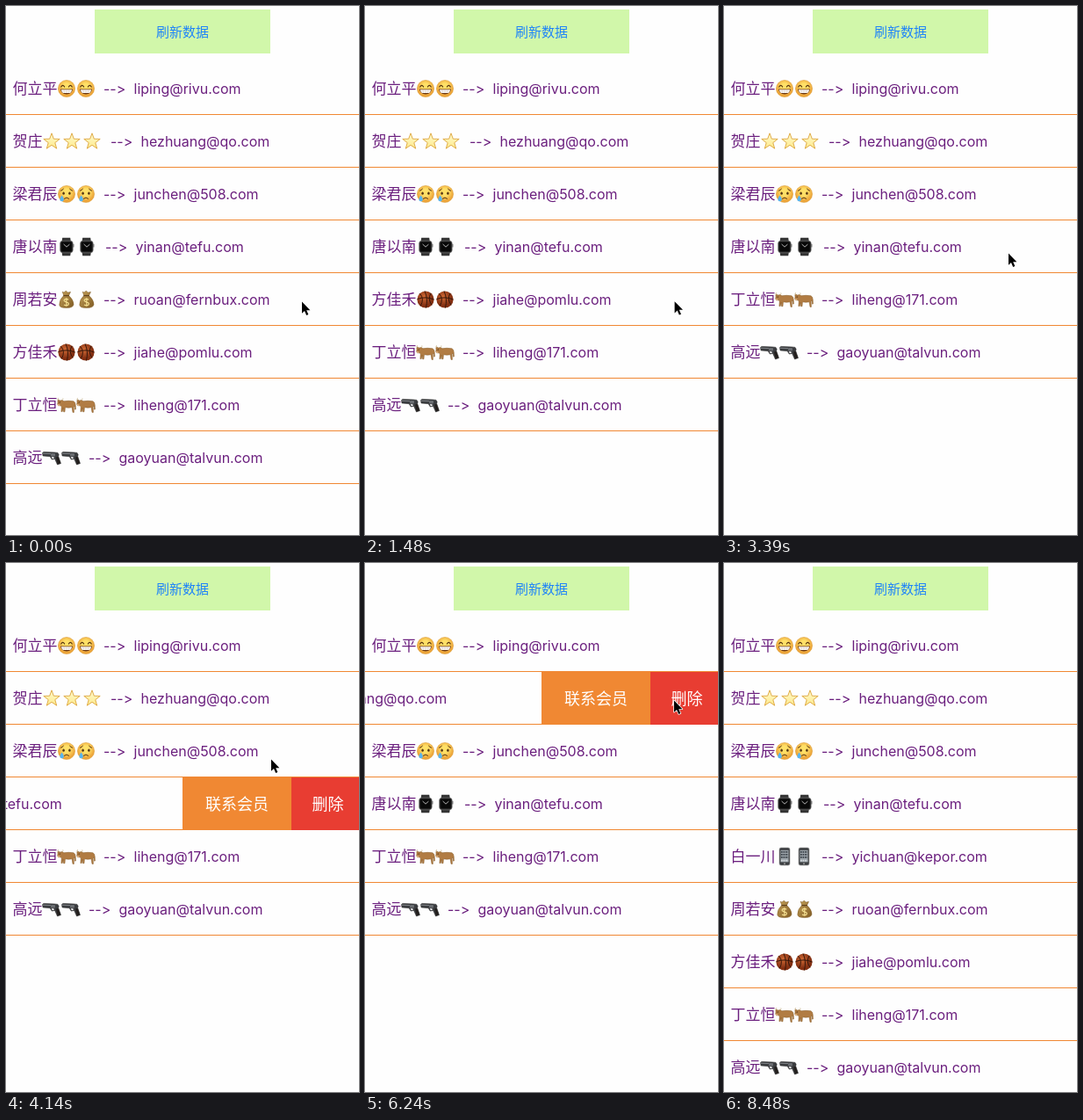
These frames come from a looping animation (402 px wide and 602 px high, 8.78 s). An HTML page:

```html
<!DOCTYPE html>
<html lang="zh-CN">
<head>
<meta charset="utf-8">
<title>Swipe list</title>
<style>
  html, body { margin: 0; width: 100%; height: 100%; overflow: hidden; background: #fefefe; }
  svg { display: block; width: 100%; height: 100%; }
  text { font: 16px Inter, "Noto Sans", sans-serif; font-variant-ligatures: none; font-feature-settings: "calt" 0; fill: #6b1f7e; white-space: pre; }
  .zh { font: 17px "Noto Sans CJK SC", "Noto Sans CJK", sans-serif; }
  .action { font: 18px "Noto Sans CJK SC", "Noto Sans CJK", sans-serif; fill: #fff; text-anchor: middle; }
  .button { font: 15px "Noto Sans CJK SC", "Noto Sans CJK", sans-serif; fill: #1f84f8; text-anchor: middle; }
</style>
</head>
<body>
<svg viewBox="0 0 402 602">
  <defs>
    <radialGradient id="face" cy=".4"><stop offset=".4" stop-color="#ffe067"/><stop offset="1" stop-color="#eda53a"/></radialGradient>
    <linearGradient id="gold" x2="0" y2="1"><stop stop-color="#fffbd0"/><stop offset="1" stop-color="#fde98a"/></linearGradient>
    <radialGradient id="ball" cx=".4" cy=".35"><stop stop-color="#d06a35"/><stop offset="1" stop-color="#843012"/></radialGradient>
    <linearGradient id="sack" x2="1" y2="1"><stop stop-color="#c6a35b"/><stop offset="1" stop-color="#7f5a22"/></linearGradient>

    <!-- Icons are drawn around their centre -->
    <g id="smile">
      <circle r="9.6" fill="url(#face)" stroke="#d9962a" stroke-width=".5"/>
      <path d="M-6.2-2q1.9-3.4 3.8 0M2.4-2q1.9-3.4 3.8 0" fill="none" stroke="#543311" stroke-width="1.2" stroke-linecap="round"/>
      <path d="M-7 .6H7Q6.4 6.4 0 6.4T-7 .6Z" fill="#6b3511"/>
      <path d="M-6.2 1.3H6.2Q5.6 4.2 4 5H-4Q-5.6 4.2-6.2 1.3Z" fill="#fff"/>
      <path d="M-5.6 3H5.6M-2.8 1.3V5M0 1.3V5M2.8 1.3V5" stroke="#c9b9a4" stroke-width=".4"/>
    </g>
    <g id="star">
      <path d="M0-9.2 2.3-2.8 9.2-2.6 3.8 1.6 5.7 8.2 0 4.3-5.7 8.2-3.8 1.6-9.2-2.6-2.3-2.8Z" fill="url(#gold)" stroke="#dda43a" stroke-width=".9" stroke-linejoin="round"/>
    </g>
    <g id="cry">
      <circle r="9.6" fill="url(#face)" stroke="#d9962a" stroke-width=".5"/>
      <ellipse cx="-3.4" cy="-.8" rx="1.2" ry="1.6" fill="#543311"/>
      <ellipse cx="3.4" cy="-.8" rx="1.2" ry="1.6" fill="#543311"/>
      <path d="M-6.5-3.8Q-4.8-4.4-3.6-5.8M6.5-3.8Q4.8-4.4 3.6-5.8M-2.6 5.2q2.6-2.6 5.2 0" fill="none" stroke="#543311" stroke-width="1" stroke-linecap="round"/>
      <path d="M-5.4 1.6q3 4 1.9 5.8t-3.8 0q-1-2 1.9-5.8Z" fill="#58b5ef"/>
    </g>
    <g id="watch">
      <path d="M-4.8-10.2h9l.7 5H-5.5ZM-5.5 5.2H4.9l-.7 5h-9Z" fill="#333"/>
      <rect x="-7.4" y="-6.8" width="14.6" height="13.6" rx="3" fill="#242424" stroke="#777" stroke-width=".6"/>
      <rect x="-5.8" y="-5.2" width="11.4" height="10.4" rx=".8" fill="#080808"/>
      <path d="M-3.4-3 0 .2 3.4-2.8" fill="none" stroke="#ddd" stroke-width=".8"/>
      <rect x="7.2" y="-3" width="1.2" height="3.5" fill="#666"/>
    </g>
    <g id="phone">
      <rect x="-6" y="-10" width="12" height="20" rx="2" fill="#3c3e41" stroke="#999" stroke-width=".6"/>
      <rect x="-4.6" y="-7.2" width="9.2" height="13.6" fill="#9aa2a8"/>
      <path d="M-3.9-5.2h8M-3.9-2.2h8M-3.9.8h8" stroke="#343b42" stroke-width="1.7" stroke-dasharray="1.6 .9"/>
      <path d="M-3.9 4.6h8" stroke="#d8dcdf" stroke-width="1.7" stroke-dasharray="1.6 .9"/>
      <circle cy="8.2" r="1" fill="#999"/>
    </g>
    <g id="money">
      <path d="M-3.2-4.5-4.8-8.8-3-8 -.8-9.8 1.5-8l3-.6-2 4.2Q8 .4 8 5.6 7.6 9.6-.3 9.6T-8.2 6Q-8.4.2-3.2-4.5Z" fill="url(#sack)" stroke="#79551f" stroke-width=".5"/>
      <path d="M-3.6-4.4h6.4" stroke="#63431c" stroke-width="1.3"/>
      <path d="M2.2.3Q-.4-1.3-2.5.1-3.9 1.9-.5 2.9q4 1 2.5 3-2.2 1.6-5 0M-.2-1.8v9.6" fill="none" stroke="#f4df91" stroke-width="1.2"/>
    </g>
    <g id="basketball">
      <circle r="9.6" fill="url(#ball)"/>
      <path d="M-9.4-.5Q0-4 9.4 0M-1-9.5Q3-1 .5 9.5M-6.6-6.8Q-1-1-5.8 7.6M6-7.2Q2 0 7.2 6.3" fill="none" stroke="#35160a" stroke-width="1"/>
    </g>
    <g id="ox">
      <path d="M-10-3.2Q-10.6-5.4-9.4-6.2L-7.8-5-4.6-5.4-3.2-4.2Q2-5.2 8-4.2q2 .8 2.2 4.2l.2 5-.9.2-.5-4.2-.9 1.2.3 6.2H7L6.2 2.8 2.2 3.2-1.6 2.8-2 7.8H-3.4L-3.8 3.4-4.8 7.6H-6.1L-5.7 1.8-7 .8-9.4.8-10.3-.8Z" fill="#b17c43" stroke="#80551f" stroke-width=".5"/>
      <path d="M-9.6-5.6Q-10.8-7.4-9.2-7.8M-5-5.4Q-3.6-6.4-4.2-7.6" fill="none" stroke="#cfc09b" stroke-width=".9"/>
      <path d="M-10.2-.9-7.6-.5-7.8.9H-9.5Z" fill="#dfb587"/>
      <circle cx="-7.8" cy="-3" r=".6" fill="#22150b"/>
    </g>
    <g id="pistol">
      <path d="M-10.5-5.4-9.2-6.6 3-6.1 7-5.6 8.2-3.4 7.7-1.6 10.5 6.6 6.5 8 3.6 1.4.2 2.1-1.8-1.3-10-2Z" fill="#3b3d40" stroke="#222" stroke-width=".5"/>
      <path d="M5-.4 7.5-1 10.2 6.3 6.8 7.5Z" fill="#231f1d"/>
      <path d="M-10-4.8-1-4.4" stroke="#8b8e91" stroke-width=".9"/>
      <rect x="-1" y="-5" width="5" height="3.6" rx="1" fill="#6a6d71"/>
      <path d="M-.2-.8h2.5l.5 1.6-2 .4Z" fill="#fff"/>
    </g>
  </defs>

  <rect width="402" height="602" fill="#fefefe"/>
  <g id="list"></g>
  <rect width="402" height="64" fill="#fefefe"/>
  <rect x="101" y="4" width="200" height="50" fill="#d1f7aa"/>
  <text id="refresh" class="button" x="201" y="34.7">刷新数据</text>
  <path id="cursor" d="M0 .6V13.8L3 11 5.2 16 7.4 15.1 5.2 10.2H9.4Z" fill="#000" stroke="#fff" stroke-width="1.4" paint-order="stroke" stroke-linejoin="round"/>
</svg>
<script>
const LOOP = 8780, ROW = 60, TOP = 64, EDGE = 408, OPEN = 207;
const RELOAD = 7400;

// name, icon, icon count, icon pitch, arrow x, mail
const people = [
  ['何立平', 'smile', 2, 22, 111, 'liping@rivu.com'],
  ['贺庄', 'star', 3, 23, 119, 'hezhuang@qo.com'],
  ['梁君辰', 'cry', 2, 22, 111, 'junchen@508.com'],
  ['唐以南', 'watch', 2, 23, 113, 'yinan@tefu.com'],
  ['白一川', 'phone', 2, 22, 111, 'yichuan@kepor.com'],
  ['周若安', 'money', 2, 23, 111, 'ruoan@fernbux.com'],
  ['方佳禾', 'basketball', 2, 22, 111, 'jiahe@pomlu.com'],
  ['丁立恒', 'ox', 2, 22, 111, 'liheng@171.com'],
  ['高远', 'pistol', 2, 22, 94, 'gaoyuan@talvun.com']
];

// Per row: when it slides open, slides shut and is removed
const gestures = {
  1: { open: [5470, 5920], remove: [6480, 6800] },
  2: { open: [4470, 4920], shut: [5470, 5920] },
  3: { open: [3390, 3840], shut: [4470, 4920] },
  4: { remove: [-2, -1] },
  5: { open: [90, 540], remove: [1100, 1420] },
  6: { open: [1580, 2030], remove: [2480, 2800] }
};

const cursorPath = [
  [0, 337, 336], [90, 337, 336], [440, 262, 334], [730, 383, 326], [1150, 383, 326],
  [1550, 345, 338], [1980, 262, 336], [2210, 319, 335], [2480, 364, 335], [2620, 364, 335],
  [3100, 328, 283], [3390, 324, 281], [3800, 246, 276], [4140, 302, 223], [4440, 298, 221],
  [4780, 246, 206], [4890, 272, 190], [5190, 312, 167], [5490, 302, 166], [5900, 242, 152],
  [6240, 352, 156], [6600, 352, 156], [7200, 221, 30], [7440, 221, 30], [8190, 363, 587]
];

// The picture is refreshed in bursts: first change, last change, number of changes
const bursts = [
  [150, 730, 5], [1180, 2210, 8], [2360, 3100, 6], [3390, 4140, 6], [4440, 5190, 6],
  [5490, 6240, 6], [6540, 7440, 7], [7590, 8190, 5], [8480, 8480, 1]
];
const ticks = [0];
for (const [from, to, count] of bursts)
  for (let i = 0; i < count; i++)
    ticks.push(count > 1 ? Math.round((from + (to - from) * i / (count - 1)) / 10) * 10 : from);

const byId = id => document.getElementById(id);

function rowMarkup([name, icon, count, pitch, arrowX, mail]) {
  const iconX = 18 + 17 * name.length;
  const icons = Array.from({ length: count }, (_, i) =>
    `<use href="#${icon}" x="${iconX + pitch * i}" y="30"/>`).join('');
  return `<g>
    <rect width="${EDGE}" height="${ROW}" fill="#fefefe"/>
    <g class="actions">
      <rect x="201" width="124" height="${ROW}" fill="#f08833"/>
      <rect x="325" width="83" height="${ROW}" fill="#e83d32"/>
      <text class="action" x="263" y="36.7">联系会员</text>
      <text class="action" x="366.5" y="36.7">删除</text>
    </g>
    <g class="content">
      <rect width="${EDGE}" height="${ROW}" fill="#fefefe"/>
      <rect y="59" width="${EDGE}" height="1" fill="#f08833"/>
      <text class="zh" x="7.5" y="36.2">${name}</text>${icons}
      <text x="${arrowX}" y="36">--&gt;</text>
      <text x="${arrowX + 34.5}" y="36">${mail}</text>
    </g>
  </g>`;
}

byId('list').innerHTML = people.map(rowMarkup).join('') +
  `<rect id="footer" width="${EDGE}" height="602" fill="#fefefe"/>`;
const rows = [...byId('list').querySelectorAll(':scope > g')].map(node => ({
  node,
  actions: node.querySelector('.actions'),
  content: node.querySelector('.content')
}));

function ramp(t, span) {
  if (!span) return 0;
  const x = Math.min(1, Math.max(0, (t - span[0]) / (span[1] - span[0])));
  return x * x * (3 - 2 * x);
}

function cursorAt(t) {
  const next = cursorPath.findIndex(key => key[0] > t);
  if (next < 0) return cursorPath[cursorPath.length - 1].slice(1);
  const [t0, x0, y0] = cursorPath[next - 1], [t1, x1, y1] = cursorPath[next];
  const k = (t - t0) / (t1 - t0);
  return [x0 + (x1 - x0) * k, y0 + (y1 - y0) * k];
}

const move = (node, x, y) => node.setAttribute('transform', `translate(${x.toFixed(2)} ${y.toFixed(2)})`);
const show = (node, visible) => node.setAttribute('visibility', visible ? 'inherit' : 'hidden');

function render(time) {
  const t = ticks.filter(tick => tick <= time).pop();
  let y = TOP;
  rows.forEach((row, i) => {
    const g = t < RELOAD && gestures[i] || {};
    const gone = ramp(t, g.remove);
    const offset = OPEN * (ramp(t, g.open) - ramp(t, g.shut));
    show(row.node, gone < 1);
    show(row.actions, offset > 0);
    move(row.node, 0, y);
    move(row.content, -offset, 0);
    y += ROW * (1 - gone);
  });
  move(byId('footer'), 0, y);
  byId('refresh').setAttribute('opacity', t > 7250 && t < 7500 ? 0.2 : 1);
  move(byId('cursor'), ...cursorAt(t));
  show(byId('cursor'), t < 8480);
}

const start = performance.now();
function frame() {
  render((performance.now() - start) % LOOP);
  requestAnimationFrame(frame);
}
frame();
</script>
</body>
</html>
```
